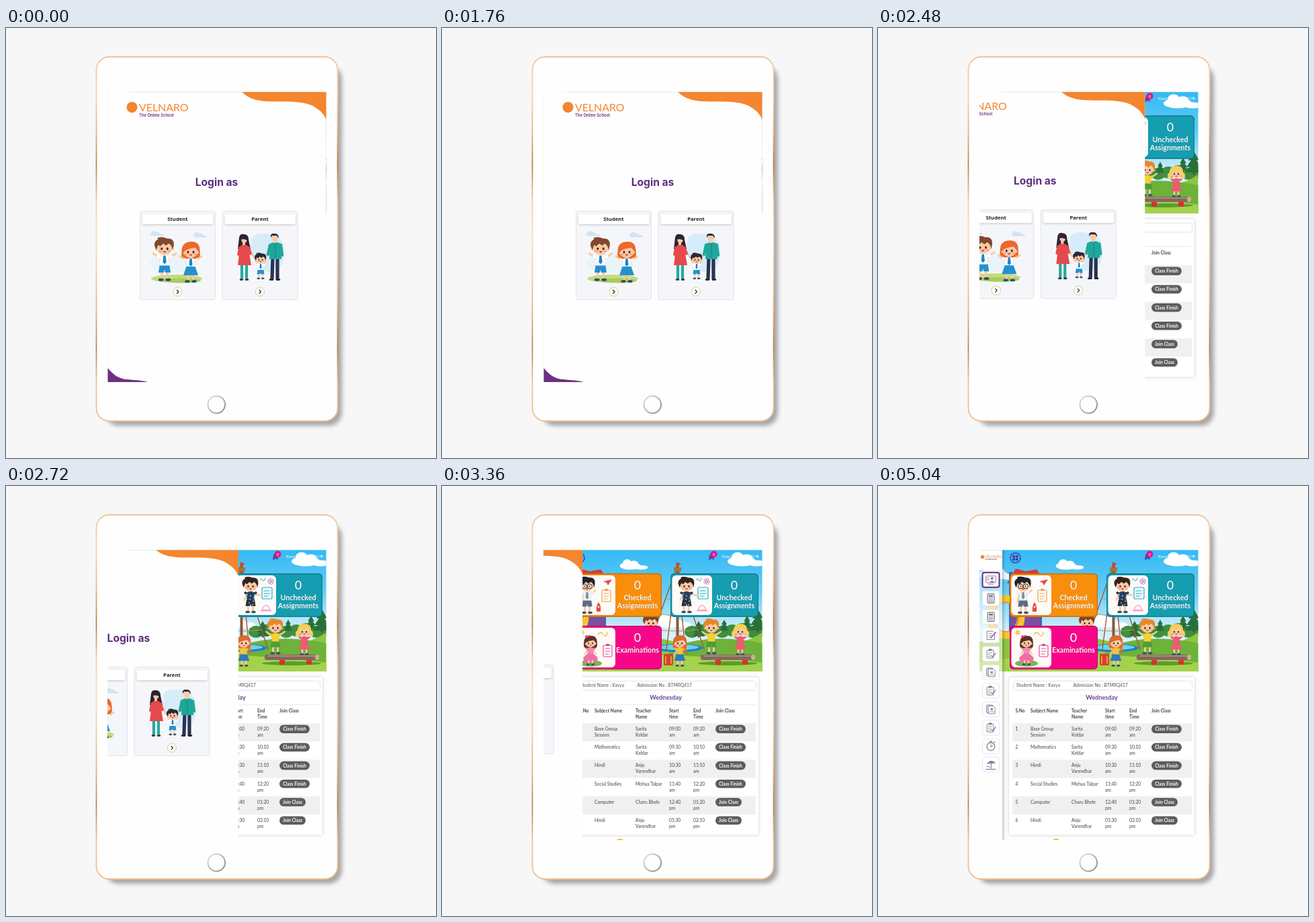
These frames come from a looping animation (640 px wide and 640 px high, 5.68 s). An HTML page:

```html
<!DOCTYPE html>
<html lang="en">
<head>
<meta charset="utf-8">
<title>Tablet school portal</title>
<style>
  html, body { margin: 0; height: 100%; overflow: hidden; background: #f7f7f7; }
  svg { display: block; width: 100vw; height: 100vh; }
  text { font-family: Lato, sans-serif; }
  .soft { filter: drop-shadow(0 1px 1.5px #0003); }
  .lit { filter: drop-shadow(.6px .8px .6px #0007); }
</style>
</head>
<body>
<svg id="stage" viewBox="0 0 640 640"></svg>
<script>
const LOOP = 5680, STEP = 80, SLIDE_START = 2107, SLIDE_SPEED = 0.2138;
const PURPLE = '#5f2d7e', ORANGE = '#f5852f', SKIN = '#fbc9a2';

// Drawing helpers, each returns SVG markup
const P = (d, fill, stroke = 'none', w = 1) =>
  `<path d="${d}" fill="${fill}" stroke="${stroke}" stroke-width="${w}" stroke-linecap="round" stroke-linejoin="round"/>`;
const L = (d, stroke, w = 1) => P(d, 'none', stroke, w);
const C = (x, y, rx, fill, ry = rx, more = '') =>
  `<ellipse cx="${x}" cy="${y}" rx="${rx}" ry="${ry}" fill="${fill}" ${more}/>`;
const R = (x, y, w, h, fill, r = 0, more = '') =>
  `<rect x="${x}" y="${y}" width="${w}" height="${h}" rx="${r}" fill="${fill}" ${more}/>`;
const T = (x, y, s, size, fill, more = '') =>
  `<text x="${x}" y="${y}" font-size="${size}" fill="${fill}" ${more}>${s}</text>`;
const at = (x, y, k, s) => `<g transform="translate(${x} ${y}) scale(${k})">${s}</g>`;
const each = (n, f) => Array.from({ length: n }, (_, i) => f(i)).join('');
const MID = 'text-anchor="middle"', BOLD = 'font-weight="700"';
const cloud = (x, y, k, fill) => at(x, y, k,
  C(0, 0, 14, fill, 5) + C(-4, -4, 6, fill, 5) + C(5, -3, 6, fill, 4) + C(15, 2, 9, fill, 3));

// Cartoon child; origin is the centre of the head
function kid(x, y, k, hair, top, bottom, { girl, tails, tie, glasses, arms = 'M-6 15L-16 8M6 15L16 8' } = {}) {
  return at(x, y, k,
    (tails ? C(-13, 5, 4, hair, 6) + C(13, 5, 4, hair, 6) : girl ? P('M-13-1Q-16 10-9 12H9Q16 10 13-1Z', hair) : '') +
    L('M-4 32V43M4 32V43', SKIN, 3.2) + C(-5, 45, 3.8, '#34506e', 2) + C(5, 45, 3.8, '#34506e', 2) +
    L(arms, SKIN, 2.8) + L('M-5 14L-9 12.5M5 14L9 12.5', top, 4) +
    P('M-6 12Q0 8 6 12L6.5 27H-6.5Z', top, '#0002', .5) +
    P(girl ? 'M-6.5 23H6.5L11 36H-11Z' : 'M-7 25H7L8.5 35H1L0 31-1 35H-8.5Z', bottom) +
    (tie ? P('M-1.5 11H1.5L2.5 20 0 23-2.5 20Z', tie) : '') +
    C(-11, 2, 2, SKIN) + C(11, 2, 2, SKIN) + C(0, 0, 11, SKIN, 10) +
    P(girl ? 'M-13 5Q-16-13 0-14T13 5Q11-2 6-5Q-6-3-9 0Z'
           : 'M-11.5 3Q-18-7-9-12L-10-14Q-2-16 3-13Q14-14 13-3L11.5 3Q10-4 6-6L2-3-2-6-6-2-9-4Z', hair) +
    C(-4, 1.5, 1.4, '#3b2a25', 1.9) + C(4, 1.5, 1.4, '#3b2a25', 1.9) +
    C(-6.5, 5, 1.8, '#f6a08a', 1.2) + C(6.5, 5, 1.8, '#f6a08a', 1.2) +
    P('M-2.5 4.8H2.5Q0 9.5-2.5 4.8Z', '#c5453c') +
    (glasses ? C(-4.3, 1.5, 4, '#fff6', 3.8, 'stroke="#222"') + C(4.3, 1.5, 4, '#fff6', 3.8, 'stroke="#222"') : ''));
}

const wordmark = C(187.5, 118, 8, ORANGE) +
  T(198, 124, 'VELNARO', 15.9, ORANGE) +
  T(198, 132, 'The Online School', 5.9, PURPLE, 'style="font-family:Inter,sans-serif;font-weight:600"');

// ---------- Login screen ----------
const students =
  cloud(222, 307, .55, '#cfe5f6') + cloud(286, 309, .55, '#cfe5f6') +
  C(250, 350, 36, '#e9f3fa', 14) + C(254, 373, 38, '#c3dc7d', 6) + C(262, 376, 28, '#a9cc5c', 3.5) +
  kid(236, 327, 1.06, '#80492f', '#fff', '#2590cf', { tie: '#2083c4' }) +
  kid(275, 332, 1, '#ec682c', '#fff', '#2590cf', { girl: true, tie: '#2083c4' });

const family =
  P('M366 312Q374 303 392 307Q416 310 414 337Q413 360 394 363Q374 363 376 346Q363 338 364 324Z', '#d6edf9') +
  L('M348 328L347 346M362 328L369 342', SKIN, 2.6) +
  P('M347 312Q348 306 354 307Q361 307 361 315L364 329H345Z', '#2b2436') +
  L('M351 352V373M358 352V373', '#25a99d', 4.2) + L('M349 374.5H352M357 374.5H360', '#333', 2.5) +
  P('M349 324Q354 321 360 324L365 353H345Z', '#e5494c') + L('M348 327L346 337M361 327L364 336', '#e5494c', 3.8) +
  R(352, 317, 4, 6, SKIN) + C(354.5, 315, 4.3, SKIN, 5) + P('M349 315Q350 307 356 309Q361 311 360 317Q356 313 349 315Z', '#2b2436') +
  L('M392 325L389 339M409 325L410 340', SKIN, 3) +
  L('M397 342L396 373M404 342V373', '#2a3350', 5.2) + L('M393 374.5H397M403 374.5H407', '#222', 2.5) +
  P('M393 321Q401 316 409 321L410 344H392Z', '#1ea79b') + L('M393 323L390 337M409 323L411 338', '#1ea79b', 4.3) +
  L('M401 320V342', '#137f78', .8) + R(398, 314, 4.5, 6, SKIN) + C(400, 312, 4.8, SKIN, 5.6) +
  P('M394 312Q393 305 399 306Q406 305 406 313L403 309 396 309Z', '#29293b') +
  kid(379, 344, .64, '#2c2838', '#fff', '#2590cf', { tie: '#2083c4', arms: 'M-6 15L-13 2M6 15L13 2' });

const choice = (x, label) =>
  R(x, 272.5, 112, 132, '#f5f6f9', 3, 'stroke="#e2e3e7"') +
  R(x + 3.5, 276.5, 105.5, 15.5, '#fff', 3, 'class="soft"') +
  T(x + 56, 287, label, 7.7, '#222', `${MID} ${BOLD} style="font-family:Open Sans,sans-serif"`) +
  C(x + 56, 392.5, 6.6, '#fff', 6.6, 'stroke="#cfd58c"') + L(`M${x + 55} 390l2.4 2.5-2.4 2.5`, '#222', 1.2);

const login =
  R(151, 95, 326, 450, '#fefefe') + L('M151.5 95V527', '#eee', .7) +
  P('M351 95C362 107 378 109.5 400 109.5C430 109.5 448 110 460 118C470 124 474 130 477 137V95Z', ORANGE) +
  P('M151.5 506C158 514 166 522 180 523C190 524 200 524 211 527H151.5Z', '#6c3180') +
  wordmark +
  T(313.5, 235, 'Login as', 15.6, PURPLE, `${MID} style="font-family:Inter,sans-serif;font-weight:700"`) +
  choice(199.5, 'Student') + choice(322, 'Parent') + students + family;

// ---------- Dashboard ----------
const pine = (x, y, k) => at(x, y, k,
  R(-1.5, 0, 3, 5, '#6b4a2b') + P('M0-30L8-16H4L11-6H6L13 2H-13L-6-6H-11L-4-16H-8Z', '#28703a'));

const hero =
  R(151, 95, 326, 181, 'url(#sky)') +
  cloud(446, 112, 1.5, '#fff') + cloud(280, 119, 1.1, '#fff') + cloud(172, 132, 1.5, '#e8f7fd') + cloud(338, 204, 1.4, '#fff') +
  each(8, i => C(372 + i * 15, 217 - i % 3 * 2, 11, '#3f8f3d', 9)) +
  P('M151 232Q230 205 330 228T476.5 218V276H151Z', '#8cc63e') +
  P('M340 240Q400 218 477 234V276H330Z', '#6db33a') + P('M151 262Q300 240 477 263V276H151Z', '#a4d24c') +
  pine(382, 222, .7) + pine(470, 213, 1) + pine(454, 211, .6) + pine(420, 214, .5) +
  // play house
  P('M192 145L205 123 220 127 236 124 250 145Z', '#d93a35') + R(195, 128, 5, 95, '#3566b5') +
  R(240, 130, 4, 90, '#3566b5') + R(198, 192, 44, 18, '#7a4fa0') +
  C(190, 195, 24, 'none', 28, 'stroke="#f7c52e" stroke-width="9"') + C(190, 195, 18, 'none', 22, 'stroke="#e89a22" stroke-width="2"') +
  // climbing net
  C(352, 241, 36, '#1f7fc2', 6) + C(352, 240, 30, '#6fd0ef', 4) +
  each(4, i => L(`M350 119L${306 + i * 28} 243`, '#a2563a', 1.4)) +
  each(4, i => L(`M${342 - i * 7} ${145 + i * 23}Q350 ${149 + i * 23} ${357 + i * 8} ${145 + i * 23}`, '#c98a5a', 1)) +
  R(348.5, 116, 4, 128, '#8b5a34') + R(345, 121, 11, 6, '#b0702f', 1) + P('M349 113L356 116 349 119Z', '#e33') +
  R(330, 250, 14, 17, '#d8402f', 2) + L('M333 254V264M341 254V264', '#f4b942', 1.5) +
  kid(311, 203, .85, '#7d4526', '#f2f2f2', '#d84c4c') +
  kid(354, 233, .76, '#dd6b2c', '#f4c437', '#2d78bd', { girl: true, arms: 'M-6 15L-11 24M6 15L13 12' }) +
  L('M361 238L364 249', '#dd6b2c', 3) +
  // balance log
  C(425, 264, 44, '#5a9c30', 3) + R(407, 255, 8, 11, '#d8312d', 1) + R(447, 255, 8, 11, '#d8312d', 1) +
  R(385, 251, 80, 8, '#86675a', 3) + L('M390 253H460', '#b4988a', 1.5) + C(463, 255, 3, '#cfae8c', 4) +
  kid(401, 210, .86, '#e8862a', '#f8cf2f', '#4c9c3e') +
  kid(444, 216, .76, '#f5cf57', '#ee5b73', '#ee5b73', { girl: true, tails: true }) +
  // header marks
  C(204.5, 107, 7.5, '#4d3b9d22', 7.5, 'stroke="#3d35a0" stroke-width="1.6" stroke-dasharray="3 .8"') +
  each(2, i => R(200.5, 103.3 + i * 4.3, 3.4, 3.2, '#3d35a0', .6) + R(205, 103.3 + i * 4.3, 3.4, 3.2, '#3d35a0', .6)) +
  P('M397 111L398 103Q401 98 404 103L405 110 401 108Z', '#4d49a6') + C(404.5, 101.5, 5, '#e5128a') +
  T(404.5, 104, '8', 6, '#fff', MID) + T(417, 106.5, 'Kavya(BTMRQ417)', 6.3, '#fff') + P('M468 104H472L470 106Z', '#fff');

const clip = (x, y, c) => R(x, y, 13, 17, 'none', 1.5, `stroke="${c}" stroke-width="1.1"`) +
  R(x + 4, y - 2, 5, 3, c, 1) + L(`M${x + 3} ${y + 5}h7m-7 4h7m-7 4h5`, c, .9);

const tile = (x, y, color, count, lines, art) =>
  R(x, y, 131, 65, color, 6, 'class="lit"') + R(x + .7, y + .7, 129.6, 63.6, 'none', 5.5, 'stroke="#0003" stroke-width="1.4"') +
  R(x + 2.5, y + 3, 59.5, 59, '#fdfbf8', 6) +
  `<g class="lit">${T(x + 95, y + 24, count, 18, '#fff', `${MID} font-weight="500"`)}` +
  lines.map((s, i) => T(x + 95, y + 40 + i * 11.8, s, 10.7, '#fff', `${MID} ${BOLD}`)).join('') + '</g>' + art;

const tiles =
  tile(196, 130, '#f98e0c', 0, ['Checked', 'Assignments'],
    P('M240 142L253 139 247 148 245 144Z', '#e84c3d') + clip(238, 155, '#f19a3c') +
    P('M230 187Q229 178 233 173Q237 178 236 187Z', '#e84c3d') + C(233, 180, 1.3, '#fff') +
    kid(216, 148, .9, '#20232e', '#eef2f7', '#5a6b85', { glasses: true, tie: '#7f8ca0', arms: 'M-6 15L-9 27M6 15L14 8' })) +
  tile(340, 130, '#169db1', 0, ['Unchecked', 'Assignments'],
    R(381, 151, 15, 17, '#eafafd', 2, 'stroke="#31a9c4" stroke-width="1.2"') + L('M384 156h8m-8 4h9m-9 4h6', '#31a9c4', 1) +
    L('M378 140q2-4 4 0t4-3', '#31a9c4') + each(5, i => C(394 + 2.7 * Math.cos(i * 1.26), 142 + 2.7 * Math.sin(i * 1.26), 1.8, 'none', 1.8, 'stroke="#c05bc0" stroke-width=".7"')) +
    P('M381 184Q387 170 393 184Z', 'none', '#ee83b5') + L('M379 186H395', '#ee83b5') +
    kid(364, 148, .88, '#33231f', '#27435f', '#27303f', { arms: 'M-6 15L-11 25M6 15L18 17' }) +
    each(8, i => C(359 + i * 5 % 11, 161 + i * 2.6, .8, '#fff'))) +
  tile(196, 208, '#f70687', 0, ['Examinations'],
    C(208, 218, 3.5, '#f9cf4b') + L('M232 221q4-6 8 0t6-3', '#f5bb40', 1.3) + clip(240, 237, '#e43c98') +
    C(221, 264, 17, '#6abf4b', 5) + P('M210 256Q221 242 232 256L230 263H212Z', '#ef6fa0') +
    kid(221, 233, .72, '#5c3025', '#f389b4', '#ef6fa0', { girl: true, arms: 'M-6 15L-12 25M6 15L12 25' }) +
    C(215, 224, 2, '#ec3f84') + C(219, 223, 1.5, '#ec3f84'));

// Sidebar icons, drawn around (0,0)
const G = '#6f747e', V = '#a566c0';
const page = P('M-6-7H3L6-4V7H-6Z', '#fff', G, 1);
const icons = {
  user: R(-8, -6.5, 16, 11, '#fff', 1, `stroke="${G}"`) + C(2, -2.5, 2.2, V) + P('M-2 4Q2-2 6 4Z', V) + L('M-6-3h3m-3 3h3M-4 7H4', G),
  calc: R(-5.5, -7.5, 11, 15, '#fff', 1.3, `stroke="${G}" stroke-width="1.3"`) + R(-3.5, -5.2, 7, 3, G) +
    each(9, i => R(-3.5 + i % 3 * 2.6, -.7 + (i / 3 | 0) * 2.5, 1.7, 1.6, i % 3 == 2 ? V : G)),
  note: page + L('M-3-3H2M-3 0H1M-3 3H0', G, .8) + L('M0 4L8-5', V, 2),
  check: R(-6.5, -6, 11, 13, '#fff', 1, `stroke="${G}"`) + R(-3.5, -8, 5, 3, G, 1) + L('M-4-2H2M-4 1H0M-4 4H0', G, .8) + L('M1 3L3 5 8-1', V, 1.5),
  docs: R(-7, -7, 10, 13, '#e7e8ec', 1, `stroke="${G}"`) + at(1.5, 1, .9, page) + C(1.5, 0, 2, V) + L('M-2 4H5', G, .8),
  clock: C(0, .5, 6.5, '#fff', 6.5, `stroke="${G}" stroke-width="1.3"`) + L('M0-3V1L3-1', V, 1.2) + L('M-2-8H2M5-6L6.5-7.5', G, 1.3),
  beach: P('M-6-2Q0-10 7-3Z', V, G, .7) + L('M0-4L1 5M-7 3H-3L0 6', G, 1.1) + L('M-8 7.5H8', V, 1.4)
};
const menu = ['user', 'calc', 'calc', 'note', 'check', 'docs', 'check', 'docs', 'check', 'clock', 'beach'];
const sidebar =
  R(185, 95, 5, 432, 'url(#edge)') + R(151, 95, 34, 30, '#fff') + R(151, 125, 34, 151, '#fff8') + R(151, 276, 34, 251, '#fefefe') +
  at(91.8, 65.3, .34, wordmark) +
  menu.map((name, i) => at(168, 139.8 + i * 27.5, 1,
    R(-12.5, -11, 25, 22, '#fff', 3, i ? 'stroke="#e1e2e6" stroke-width=".8"' : `stroke="${PURPLE}" stroke-width="2"`) +
    at(0, 0, .9, icons[name]))).join('');

// Timetable
const columns = [204.5, 227, 288, 338, 374, 407];
const heads = ['S.No', 'Subject Name', 'Teacher|Name', 'Start|time', 'End|Time', 'Join Class'];
const lessons = [
  ['Base Group|Session', 'Sarita|Keldar', '09:00|am', '09:20|am'],
  ['Mathematics', 'Sarita|Keldar', '09:30|am', '10:10|am'],
  ['Hindi', 'Anju|Varendhar', '10:30|am', '11:10|am'],
  ['Social Studies', 'Mohua Talpar', '11:40|am', '12:20|pm'],
  ['Computer', 'Charu Bhele', '12:40|pm', '01:20|pm'],
  ['Hindi', 'Anju|Varendhar', '01:30|pm', '02:10|pm']
];
const cells = (list, y, more) => list.map((cell, c) => String(cell).split('|')
  .map((s, i) => T(columns[c], y + i * 9, s, 6.7, '#444', more)).join('')).join('');
const row = (lesson, i) => {
  const y = 353 + i * 27.2, open = i > 3;
  return (i % 2 ? '' : R(200, y, 267, 27.2, '#f0f0f1')) + cells([i + 1, ...lesson], y + 11) +
    R(407, y + 2.4, open ? 39 : 45, 12.6, '#5d5d5d', 6.3) +
    T(open ? 426.5 : 429.5, y + 11.1, open ? 'Join Class' : 'Class Finish', 6.7, '#fff', `${MID} ${BOLD}`);
};
const timetable =
  R(195, 284.5, 276, 235, '#fff', 4, 'style="filter:drop-shadow(0 0 2px #0003)"') +
  R(202.5, 291, 264.5, 12.5, '#fff', 3, 'style="filter:drop-shadow(.7px .7px .8px #0004)"') +
  T(206, 299, 'Student Name : Kavya', 6.7, '#555') + T(290.5, 299, 'Admission No : BTMRQ417', 6.7, '#555') +
  T(333, 318, 'Wednesday', 9.1, '#6b4590', `${MID} ${BOLD}`) + L('M201 325.3H466', '#e6e6e8', .8) +
  cells(heads, 337, BOLD) + lessons.map(row).join('');

const dashboard = R(151, 95, 326, 432, '#fdfdfd') + hero + tiles + timetable + C(265, 533, 8, '#f2b632') + sidebar;

// ---------- Tablet ----------
const stops = (...colors) => colors.map((c, i) => `<stop offset="${i / (colors.length - 1)}" stop-color="${c}"/>`).join('');
document.getElementById('stage').innerHTML = `
  <defs>
    <clipPath id="screen">${R(151, 95.3, 325.5, 431.7, '#000')}</clipPath>
    <linearGradient id="gold" x2="0" y2="1">${stops('#f2c49a', '#f3d3b2', '#e8b77f', '#b98442', '#f2d0ab', '#f5dcc3', '#f0cba4', '#e3b27c', '#b78750', '#efc69d', '#efbd8c')}</linearGradient>
    <linearGradient id="ring" x2="1" y2="1">${stops('#e4e4e4', '#b5b5b5', '#858585')}</linearGradient>
    <linearGradient id="sky" x2="0" y2="1">${stops('#35b9f3', '#62cbf6', '#d4f0fb', '#def4fc')}</linearGradient>
    <linearGradient id="edge">${stops('#0003', '#0000')}</linearGradient>
    <filter id="blur" x="-10%" y="-10%" width="120%" height="120%"><feGaussianBlur stdDeviation="3"/></filter>
  </defs>
  ${R(0, 0, 640, 640, '#f7f7f7')}
  ${R(148, 56, 352, 536, '#8a8a8e', 20, 'filter="url(#blur)" opacity=".75"')}
  ${R(134.5, 43, 359, 542, '#fefefe', 19, 'stroke="url(#gold)" stroke-width="1.8"')}
  ${C(313.3, 560.6, 12.8, '#fefefe', 12.8, 'stroke="url(#ring)" stroke-width="2"')}
  <g clip-path="url(#screen)">${dashboard}<g id="login">${login}</g></g>`;

const panel = document.getElementById('login');
const start = performance.now();
function draw() {
  const t = Math.floor((performance.now() - start) % LOOP / STEP) * STEP;
  const x = Math.min(340, Math.max(0, (t - SLIDE_START) * SLIDE_SPEED));
  panel.setAttribute('transform', `translate(${-x} ${-x * 0.0225})`);
  requestAnimationFrame(draw);
}
draw();
</script>
</body>
</html>
```
